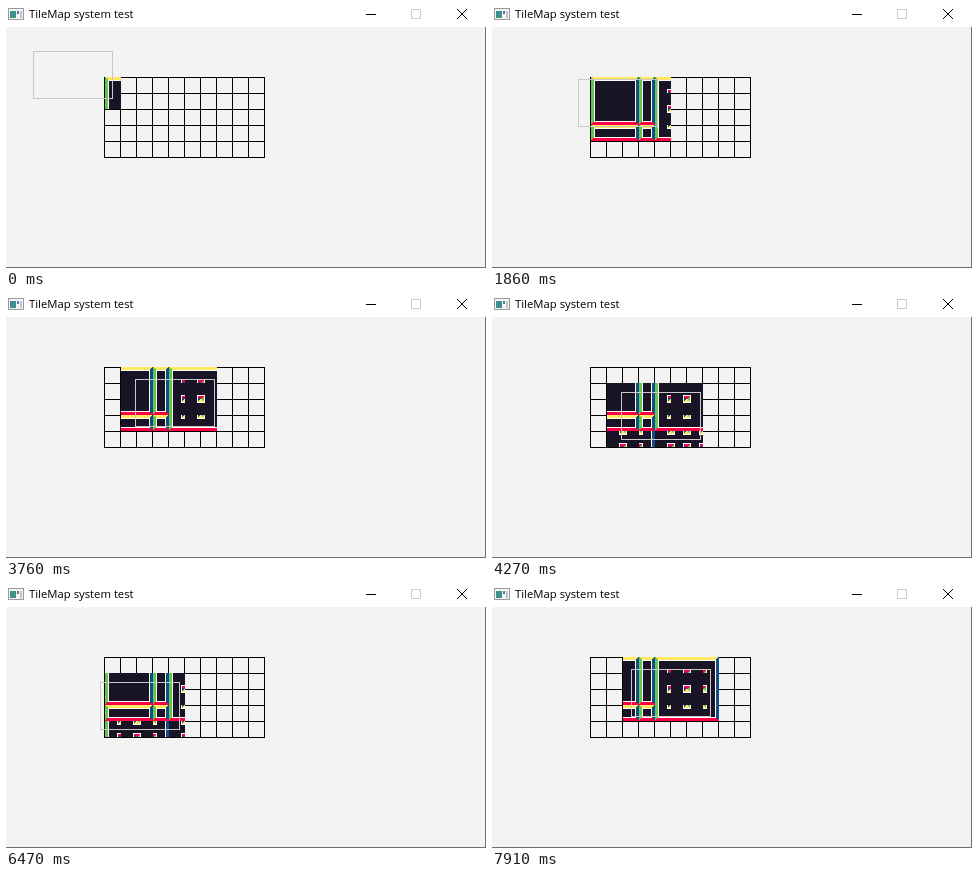
These frames come from a looping animation (480 by 262 pixels, 8 s). An HTML page with a canvas:

```html
<!DOCTYPE html>
<html lang="en">
<head>
<meta charset="utf-8">
<title>TileMap system test</title>
<style>
  html, body { margin: 0; width: 100%; height: 100%; overflow: hidden; background: #f3f3f3; }
  canvas { display: block; }
</style>
</head>
<body>
<canvas id="stage" width="480" height="262"></canvas>
<script>
const ctx = document.getElementById('stage').getContext('2d');
const LOOP = 8000, TILE = 16, COLS = 10, ROWS = 5;
const MAP = { x: 99, y: 71 };
const VIEW = { w: 80, h: 48 };
const COLOR = {
  top: '#fee761', left: '#63c74d', right: '#124e89', bottom: '#ff0044',
  floor: '#181425', edge: '#ffffff'
};

// Camera path: [time, position], straight between the points.
const PATH_X = [[0, 27], [1080, 61], [1860, 86], [2160, 95], [2970, 120], [3260, 129],
  [5037, 129], [5420, 117], [6250, 91], [6374, 91], [6470, 94], [7910, 139]];
const PATH_Y = [[0, 45], [900, 73], [3260, 73], [4200, 96], [4640, 96], [5010, 103],
  [6250, 103], [6470, 96], [7150, 96], [7570, 83]];

// Redraw rhythm: [duration, equal steps].
const RHYTHM = [[150, 1], [930, 7], [120, 1], [660, 5], [300, 2], [120, 1], [690, 5],
  [240, 2], [150, 1], [910, 6], [460, 1], [690, 5], [300, 2], [120, 1], [630, 5],
  [120, 1], [270, 2], [120, 1], [930, 7], [90, 1]];

function snapTime(t) {
  let start = 0;
  for (const [length, steps] of RHYTHM) {
    if (t < start + length) {
      const step = length / steps;
      return start + Math.floor((t - start) / step) * step;
    }
    start += length;
  }
  return start;
}

function along(path, t) {
  const next = path.findIndex(point => point[0] > t);
  if (next < 0) return path[path.length - 1][1];
  const [t0, v0] = path[next - 1], [t1, v1] = path[next];
  return Math.round(v0 + (v1 - v0) * (t - t0) / (t1 - t0));
}

function rect(c, color, x, y, w, h) {
  c.fillStyle = color;
  c.fillRect(x, y, w, h);
}

function outline(c, color, x, y, w, h) {
  c.strokeStyle = color;
  c.strokeRect(x + 0.5, y + 0.5, w - 1, h - 1);
}

// Mitred walls around a block of tiles, three colored pixels and a white inner edge.
function drawRoom(c, col, row, cols, rows, sides = ['top', 'left', 'right', 'bottom']) {
  const x = col * TILE, y = row * TILE, w = cols * TILE, h = rows * TILE;
  rect(c, COLOR.floor, x, y, w, h);
  for (let i = 0; i < 4; i++) {
    const inX = sides.includes('left') ? i : 0;
    const endX = sides.includes('right') ? i : 0;
    const inY = sides.includes('top') ? i : 0;
    const endY = sides.includes('bottom') ? i : 0;
    for (const side of sides) {
      const color = i === 3 ? COLOR.edge : COLOR[side];
      if (side === 'top') rect(c, color, x + inX, y + i, w - inX - endX, 1);
      if (side === 'bottom') rect(c, color, x + inX, y + h - 1 - i, w - inX - endX, 1);
      if (side === 'left') rect(c, color, x + i, y + inY, 1, h - inY - endY);
      if (side === 'right') rect(c, color, x + w - 1 - i, y + inY, 1, h - inY - endY);
    }
  }
}

function drawCorner(c, col, row, sideX, sideY) {
  for (let dx = 0; dx < 4; dx++) {
    for (let dy = 0; dy < 4; dy++) {
      const color = Math.max(dx, dy) === 3 ? COLOR.edge : COLOR[dy >= dx ? sideY : sideX];
      const x = col * TILE + (sideX === 'left' ? dx : TILE - 1 - dx);
      const y = row * TILE + (sideY === 'top' ? dy : TILE - 1 - dy);
      rect(c, color, x, y, 1, 1);
    }
  }
}

function buildMap() {
  const canvas = document.createElement('canvas');
  canvas.width = COLS * TILE;
  canvas.height = ROWS * TILE;
  const c = canvas.getContext('2d');
  rect(c, COLOR.floor, 0, 0, canvas.width, canvas.height);
  drawRoom(c, 0, 0, 3, 3);
  drawRoom(c, 3, 0, 1, 3);
  drawRoom(c, 0, 3, 3, 1);
  drawRoom(c, 3, 3, 1, 1);
  drawRoom(c, 4, 0, 4, 4);
  drawRoom(c, 0, 4, 4, 1, ['left', 'right']);
  for (let col = 4; col < 8; col++) {
    for (let row = 0; row < 4; row++) {
      drawCorner(c, col, row, col < 6 ? 'right' : 'left', row < 2 ? 'bottom' : 'top');
    }
  }
  for (const sideY of ['top', 'bottom']) {
    for (const col of [0, 1, 4, 5, 6]) drawCorner(c, col, 4, 'right', sideY);
    for (const col of [2, 3, 5, 6]) drawCorner(c, col, 4, 'left', sideY);
  }
  return canvas;
}

function drawWindow() {
  rect(ctx, '#f3f3f3', 0, 0, 480, 262);
  rect(ctx, '#ffffff', 0, 0, 480, 21);
  rect(ctx, '#707070', 479, 21, 1, 241);
  rect(ctx, '#707070', 0, 261, 480, 1);

  rect(ctx, '#f4f4f4', 2, 2, 16, 12);
  outline(ctx, '#9a9a9a', 2, 2, 16, 12);
  rect(ctx, '#3f8f8a', 4, 5, 6, 7);
  rect(ctx, '#4f7fa8', 11, 5, 2, 3);
  rect(ctx, '#c4c4c4', 14, 5, 2, 7);

  ctx.font = '11.3px "Open Sans", "Noto Sans", sans-serif';
  ctx.fillStyle = '#000';
  ctx.fillText('TileMap system test', 23, 12);

  rect(ctx, '#000', 360, 8, 10, 1);
  outline(ctx, '#cccccc', 405, 3, 10, 10);
  ctx.strokeStyle = '#000';
  ctx.beginPath();
  ctx.moveTo(451, 3);
  ctx.lineTo(461, 13);
  ctx.moveTo(461, 3);
  ctx.lineTo(451, 13);
  ctx.stroke();
}

function drawGrid() {
  const x = MAP.x - 1, w = COLS * TILE, h = ROWS * TILE;
  for (let i = 0; i <= COLS; i++) rect(ctx, '#000', x + i * TILE, MAP.y, 1, h + 1);
  for (let i = 0; i <= ROWS; i++) rect(ctx, '#000', x, MAP.y + i * TILE, w + 1, 1);
}

// Range of tiles touched by the camera on one axis, in map pixels.
function visible(start, size, count) {
  const first = Math.max(0, Math.floor(start / TILE));
  const last = Math.min(count - 1, Math.floor((start + size - 1) / TILE));
  return [first * TILE, (last - first + 1) * TILE];
}

const map = buildMap();

function draw() {
  const t = snapTime(performance.now() % LOOP);
  const x = along(PATH_X, t), y = along(PATH_Y, t);
  const [left, width] = visible(x - MAP.x, VIEW.w, COLS);
  const [top, height] = visible(y - MAP.y, VIEW.h, ROWS);
  drawWindow();
  drawGrid();
  ctx.drawImage(map, left, top, width, height, MAP.x + left, MAP.y + top, width, height);
  outline(ctx, '#c8c8c8', x, y, VIEW.w, VIEW.h);
  requestAnimationFrame(draw);
}

draw();
</script>
</body>
</html>
```
